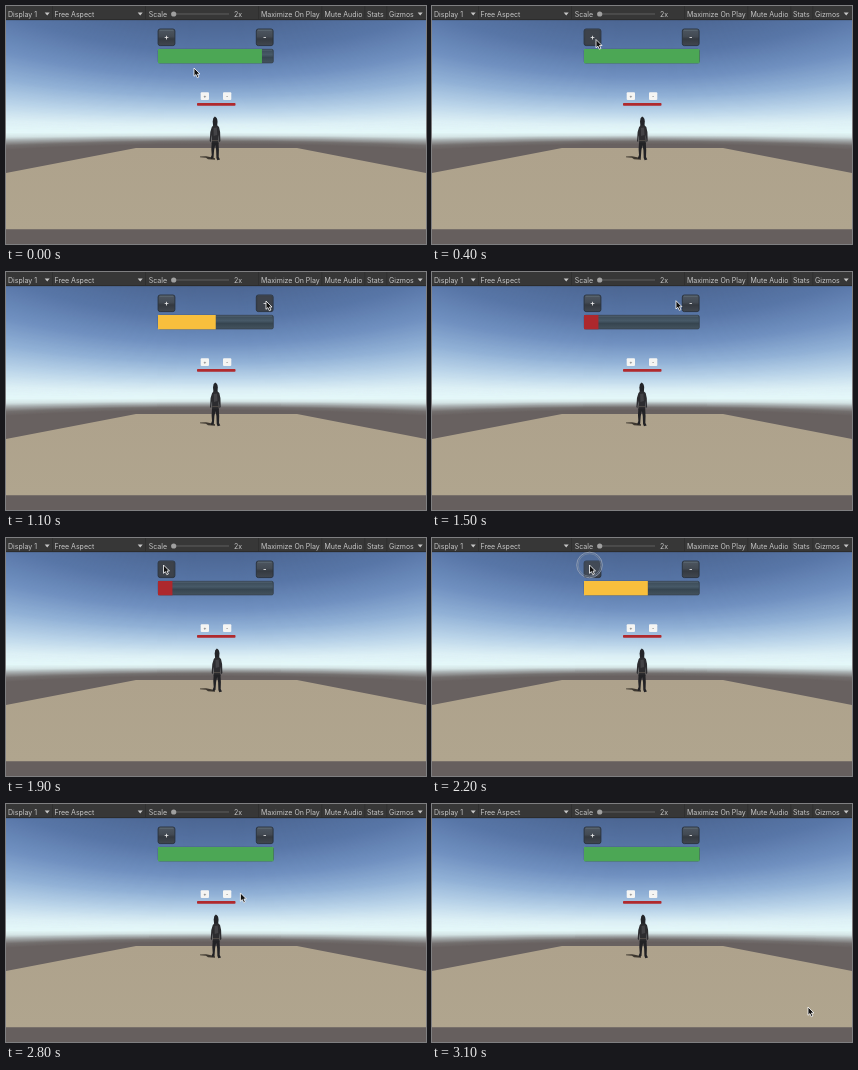
An HTML page for the animation above (3200 ms loop, 420 px wide and 238 px high).

```html
<!DOCTYPE html>
<html lang="en">
<head>
<meta charset="utf-8">
<title>Health bar</title>
<style>
  html, body { margin: 0; width: 100%; height: 100%; overflow: hidden; background: #66605f; }
  svg { display: block; width: 100vw; height: 100vh; }
  text { font-family: Inter, Roboto, sans-serif; font-size: 7px; fill: #c6c6c6; }
  .sign { font-size: 7.5px; font-weight: 600; fill: #f1f1f1; text-anchor: middle; }
  .tiny { font-size: 5px; fill: #555; text-anchor: middle; }
</style>
</head>
<body>
<svg viewBox="0 0 420 238">
  <defs>
    <linearGradient id="floor" x1="0" y1="0" x2="0" y2="1">
      <stop offset="0" stop-color="#aea28c"/>
      <stop offset="1" stop-color="#b0a58e"/>
    </linearGradient>
    <linearGradient id="key" x1="0" y1="0" x2="0" y2="1">
      <stop offset="0" stop-color="#4d5661"/>
      <stop offset=".45" stop-color="#434a53"/>
      <stop offset=".6" stop-color="#343940"/>
      <stop offset="1" stop-color="#41474f"/>
    </linearGradient>
    <linearGradient id="trough" x1="0" y1="0" x2="0" y2="1">
      <stop offset="0" stop-color="#3a4956"/>
      <stop offset=".4" stop-color="#475967"/>
      <stop offset=".6" stop-color="#364550"/>
      <stop offset="1" stop-color="#43525d"/>
    </linearGradient>
  </defs>

  <g id="sky"></g>
  <path d="M130 142H291L420 167V223.5H0V167Z" fill="url(#floor)"/>
  <rect y="223.5" width="420" height="14.5" fill="#665f5e"/>

  <path d="M194 150.500l6-.3 4 .8 5 1.200v1.600l-7-.6-2-1.500-6-.4Z" fill="#29251f" opacity=".85"/>
  <g id="hero">
    <path d="M-2.300 4.500Q-2.300.8-.2-.4 2.400.6 2.500 4.500L2.200 9-1.900 9Z" fill="#232428"/>
    <path d="M-3.200 10-1.500 8.300H2L4 10 5.100 15 5.400 24 4.100 25.300 3.500 18 3.400 27H-3.200L-3.300 18-4.200 25.300-5.300 24-4.700 15Z" fill="#2c2c2f"/>
    <path d="M-3.300 25.500H3.500L3.900 33 3.700 40 5 42.600 2.300 43.300 1.400 41 1.100 33 .2 28-.9 33-1.500 41-3.900 42-4.400 41-3.300 38-3.700 32Z" fill="#222225"/>
    <path d="M-1.500 11 1.800 10.500 2.200 18-1.300 19Z" fill="#434346"/>
    <path d="M-3 23.500H3.300" stroke="#57514b" stroke-width=".8"/>
  </g>

  <g fill="#f5f5f3">
    <rect x="194.700" y="86.300" width="8.300" height="7.800" rx="1"/>
    <rect x="217" y="86.300" width="8.300" height="7.800" rx="1"/>
  </g>
  <text class="tiny" x="198.900" y="92">+</text>
  <text class="tiny" x="221.200" y="92">-</text>
  <rect x="191" y="97" width="38.500" height="2.800" rx=".8" fill="#b0292d"/>

  <g id="plus"></g>
  <g id="minus"></g>
  <rect x="152.300" y="43.300" width="115" height="13.600" rx="1.500" fill="url(#trough)" stroke="#36424d" stroke-width=".8"/>
  <path d="M153.500 44.200H266" stroke="#627380" stroke-width=".5"/>
  <rect id="fill" x="152" y="43" height="14.300"/>

  <rect width="420" height="14" fill="#373737"/>
  <path d="M0 13.700H420" stroke="#242424" stroke-width=".7"/>
  <path d="M46.500 0V13.500M139.500 0V13.500M252.500 0V13.500M315.800 0V13.500M358.700 0V13.500M380.700 0V13.500" stroke="#2d2d2d" stroke-width=".7"/>
  <g id="labels"></g>
  <path d="M167 8H223" stroke="#5e5e5e"/>
  <circle cx="167.700" cy="8" r="2.600" fill="#a0a0a0"/>
  <path d="M38.700 6.500h5l-2.500 3ZM131.700 6.500h5l-2.500 3ZM411.700 6.500h5l-2.500 3Z" fill="#c6c6c6"/>

  <g id="cursor">
    <g id="ring" fill="none">
      <circle r="12.800" stroke="#93a0b4" stroke-width=".9" fill="#6f86ad" fill-opacity=".12"/>
      <circle r="11.300" stroke="#8492a6" stroke-width=".6"/>
    </g>
    <path d="M0 0V8.300L1.900 6.600 3.300 9.700 4.900 9 3.500 6H6Z" fill="#111" stroke="#fff" stroke-width=".8" stroke-linejoin="round"/>
  </g>
</svg>
<script>
const $ = id => document.getElementById(id);
const LOOP = 3200, STEP = 100;

// Sky colours by height above the horizon, measured on the centre line
const HORIZON = 126, FOCAL = 194;
const shades = [[112, 76, 102, 147], [80, 88, 118, 167], [55, 112, 144, 192], [36, 145, 177, 214],
  [20, 186, 212, 233], [8, 220, 239, 245], [0, 228, 248, 249], [-3, 212, 228, 229],
  [-6, 160, 165, 166], [-9, 115, 111, 110], [-12, 104, 97, 96]];

function shade(h) {
  const i = Math.max(1, shades.findIndex(s => s[0] <= h));
  const a = shades[i - 1], b = shades[i], k = (a[0] - h) / (a[0] - b[0]);
  return `rgb(${[1, 2, 3].map(c => Math.round(a[c] + (b[c] - a[c]) * k))})`;
}

// Lines of equal elevation bend away from the horizon towards the sides
function drawSky() {
  const bend = Math.hypot(1, 210 / FOCAL);
  let out = `<rect width="420" height="238" fill="${shade(112)}"/>`;
  for (let h = 111; h >= -12; h -= h > 8 ? 1 : .5) {
    const mid = HORIZON - h, side = HORIZON - h * bend;
    out += `<path d="M0 ${side}Q210 ${2 * mid - side} 420 ${side}V238H0Z" fill="${shade(h)}"/>`;
  }
  $('sky').innerHTML = out;
}
drawSky();

const labels = [[2, 'Display 1'], [48.500, 'Free Aspect'], [142.800, 'Scale'], [228, '2x'],
  [255, 'Maximize On Play'], [318.500, 'Mute Audio'], [361, 'Stats'], [383, 'Gizmos']];
$('labels').innerHTML = labels.map(([x, s]) => `<text x="${x}" y="10.700">${s}</text>`).join('');

function makeKey(id, x, sign) {
  $(id).innerHTML =
    `<rect x="${x}" y="23" width="16.800" height="16.600" rx="2" fill="url(#key)" stroke="#293039" stroke-width=".9"/>
     <path d="M${x + 1.500} 24.200h13.800" stroke="#6b7781" stroke-width=".6"/>
     <rect class="hover" x="${x + .6}" y="23.700" width="15.500" height="15.300" rx="1.500" fill="#3d424a" stroke="#353d48" stroke-width=".7"/>
     <text class="sign" x="${x + 8.400}" y="34">${sign}</text>`;
}
makeKey('plus', 152.100, '+');
makeKey('minus', 250.300, '-');

// time, x, y of the pointer tip
const path = [[0, 188, 62], [300, 164, 33.500], [500, 164, 33.500], [700, 260, 29],
  [1400, 260, 29], [1800, 157.500, 27], [2600, 157.500, 27], [3100, 376, 203]];

function pointer(t) {
  const i = path.findIndex(p => p[0] > t);
  if (i < 0) return path[path.length - 1].slice(1);
  const [t0, x0, y0] = path[i - 1], [t1, x1, y1] = path[i];
  const k = (t - t0) / (t1 - t0), e = k * k * (3 - 2 * k);
  return [x0 + (x1 - x0) * e, y0 + (y1 - y0) * e];
}

function health(t) {
  if (t < 300) return .9;
  if (t < 1900) return Math.max(.125, Math.min(1, 1 - (t - 700) / 800));
  return Math.min(1, .125 + (t - 1900) * .001425);
}

function tint(level, pressed) {
  if (level < .3) return '#ad282d';
  if (level < .6) return '#f8bf3d';
  return pressed ? '#5e9260' : '#4ca755';
}

function draw(time) {
  const t = Math.floor(time % LOOP / STEP) * STEP;
  const [x, y] = pointer(t);
  const level = health(t);
  const clicking = (t >= 700 && t < 1500) || (t >= 2000 && t < 2600);
  const pressed = clicking && t / STEP % 3 === 1;

  $('fill').setAttribute('width', 115.500 * level);
  $('fill').setAttribute('fill', tint(level, pressed));
  $('cursor').setAttribute('transform', `translate(${x} ${y})`);
  $('ring').style.display = pressed ? '' : 'none';

  for (const [id, left] of [['plus', 152], ['minus', 250]]) {
    const over = x > left && x < left + 17 && y > 23 && y < 40;
    $(id).querySelector('.hover').style.display = over ? '' : 'none';
  }

  const sway = 210 - Math.cos(2 * Math.PI * (t - 30) / 1230);
  $('hero').setAttribute('transform', `translate(${sway} 111)`);
}

const start = performance.now();
function tick() {
  draw(performance.now() - start);
  requestAnimationFrame(tick);
}
tick();
</script>
</body>
</html>
```
